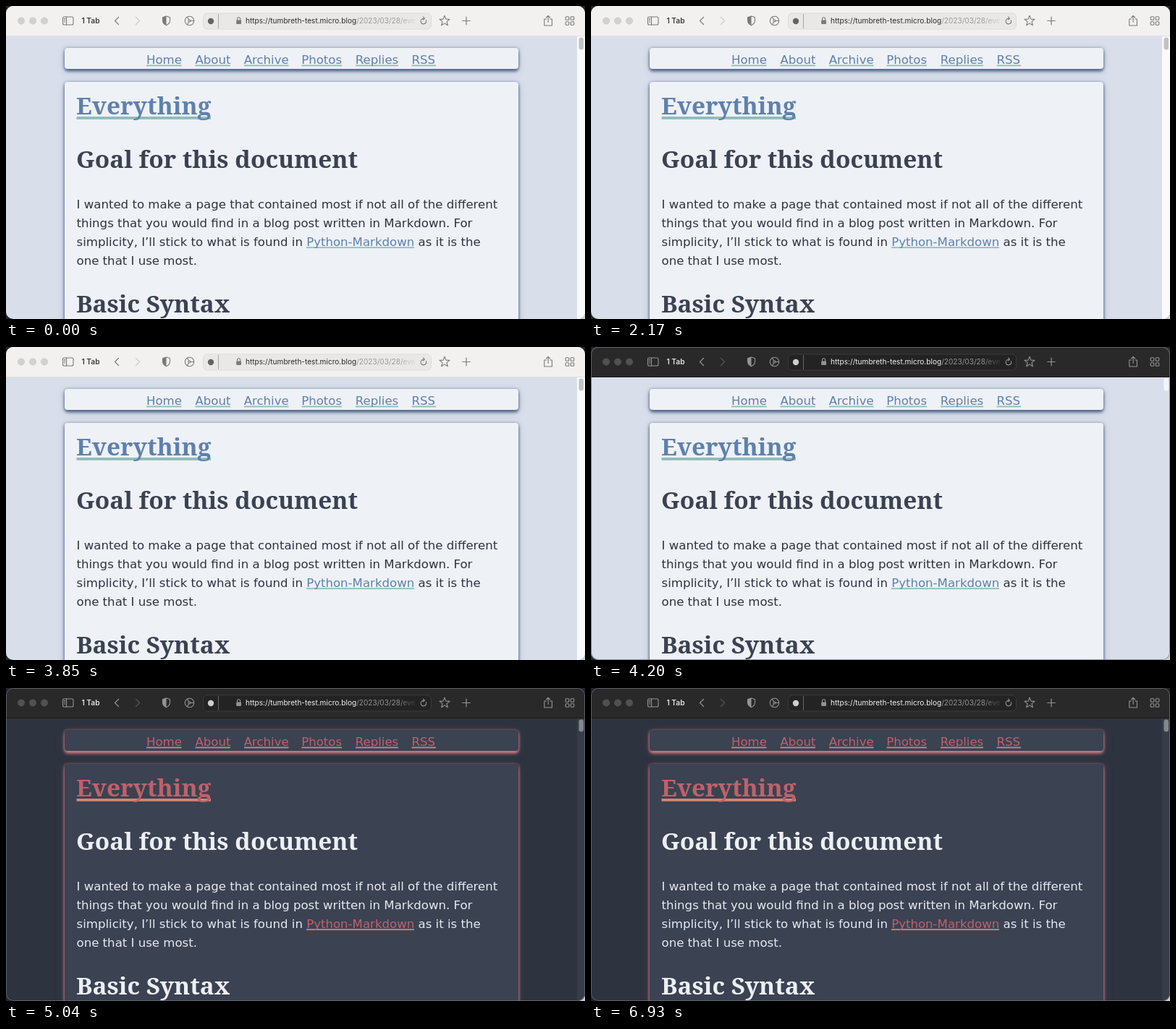
Write an HTML page that moves like this. It is 800 by 433 pixels and loops after 7140 ms.

```html
<!DOCTYPE html>
<html lang="en">
<head>
<meta charset="utf-8">
<title>Light and dark theme</title>
<style>
@property --link { syntax: '<color>'; inherits: true; initial-value: #5e81ac; }
@property --line { syntax: '<color>'; inherits: true; initial-value: #8fbcbb; }

:root {
  --bar: #f2f1f0; --edge: #dfdfe0; --rim: transparent; --dots: #d2d1d0; --dots-rim: #c3c2c1;
  --field: #e9e8e7; --field-rim: #dddcdb; --icon: #7b7a7a; --faint: #cbcac9;
  --label: #3b3b3b; --host: #2c2c2c; --path: #9b9a9a; --knob: #656464;
  --page: #d9dfea; --card: #eef1f6; --head: #3b4252; --text: #2e3440;
  --shadow: #56698a; --glow: #b3bfd3;
  --track: #fafafa; --thumb: #c2c2c2;
  animation: chrome 7140ms step-end infinite, page 7140ms step-end infinite,
    scroller 7140ms step-end infinite, links 7140ms infinite;
}
/* The browser turns dark at 4200 ms, the page one step later */
@keyframes chrome {
  58.82%, 100% {
    --bar: #2a2929; --edge: #171717; --rim: #6d7178; --dots: #525151; --dots-rim: #5b5a5a;
    --field: #242323; --field-rim: #3b3a3a; --icon: #959494; --faint: #555454;
    --label: #e4e4e4; --host: #f1f1f1; --path: #939292; --knob: #cfcece;
  }
}
@keyframes page {
  59.8%, 100% {
    --page: #2d333f; --card: #3b4252; --head: #eceff4; --text: #e5e9f0;
    --shadow: #d27a82; --glow: #4a414d;
  }
}
@keyframes scroller {
  58.82% { --track: #d9dfea; --thumb: #f3f5f8; }
  59.8%, 100% { --track: #363c48; --thumb: #83868c; }
}
@keyframes links {
  0%, 59.8% { --link: #5e81ac; --line: #8fbcbb; animation-timing-function: ease; }
  70.58%, 100% { --link: #bf616a; --line: #d08770; }
}

html, body { margin: 0; width: 100%; height: 100%; overflow: hidden; }
body { background: linear-gradient(135deg, #24262b 90%, #c9ccd2 90%); }
#window {
  position: absolute; left: 0; top: 0; width: 800px; height: 433px;
  overflow: hidden; border-radius: 10px; background: var(--page);
}
.card {
  position: absolute; left: 81px; width: 627px; border-radius: 4px; background: var(--card);
  box-shadow: 0 4px 4px -1px var(--shadow), 0 1px 4px var(--shadow), 0 3px 12px var(--glow);
}
.bar {
  position: absolute; left: 0; top: 0; width: 800px; height: 42px;
  background: var(--bar); border-bottom: 1px solid var(--edge); box-sizing: border-box;
}
.rim {
  position: absolute; inset: 0; border-radius: 10px; box-shadow: inset 0 0 0 1px var(--rim); opacity: .75;
}
svg { position: absolute; left: 0; top: 0; }
text { white-space: pre; }
.body { font: 16.59px "DejaVu Sans", Verdana, sans-serif; fill: var(--text); }
.head { font: bold 33.4px "Noto Serif", Georgia, serif; fill: var(--head); }
.link { fill: var(--link); }
.line { fill: var(--line); }
.ui { font-family: Inter, sans-serif; fill: var(--label); }
.icon { fill: none; stroke: var(--icon); stroke-width: 1.1; stroke-linecap: round; stroke-linejoin: round; }
.solid { fill: var(--icon); stroke: none; }
</style>
</head>
<body>
<div id="window">
  <div class="card" style="top:57.5px;height:29.5px"></div>
  <div class="card" style="top:104.5px;height:360px"></div>
  <div class="bar"></div>

  <svg width="800" height="433" viewBox="0 0 800 433">
    <defs>
      <linearGradient id="fade" gradientUnits="userSpaceOnUse" x1="540" y1="0" x2="570" y2="0">
        <stop offset="0" style="stop-color:var(--path)"/>
        <stop offset="1" style="stop-color:var(--path);stop-opacity:0"/>
      </linearGradient>
    </defs>

    <!-- scrollbar -->
    <rect x="789" y="42" width="11" height="391" style="fill:var(--track)"/>
    <rect x="791.5" y="43.5" width="6.5" height="17" rx="3.2" style="fill:var(--thumb)"/>

    <!-- toolbar -->
    <g style="fill:var(--dots);stroke:var(--dots-rim)" stroke-width=".6">
      <circle cx="21" cy="20.5" r="4.6"/><circle cx="37" cy="20.5" r="4.6"/><circle cx="53" cy="20.5" r="4.6"/>
    </g>
    <rect x="272.5" y="10" width="315" height="22" rx="5.5" style="fill:var(--field);stroke:var(--field-rim)"/>
    <g class="icon">
      <rect x="78.5" y="15" width="14.5" height="11" rx="2"/>
      <path d="M83.5 15v11M80.3 17.6h1.4M80.3 19.8h1.4M80.3 22h1.4"/>
      <path d="M155.5 15.5l-5 5 5 5" stroke-width="1.2"/>
      <path d="M179.5 15.5l5 5-5 5" stroke-width="1.2" style="stroke:var(--faint)"/>
      <path d="M221.5 14l5 1.8v4.4c0 3-2 5-5 6.6-3-1.6-5-3.6-5-6.6v-4.4z"/>
      <path class="solid" d="M221.5 14v12.8c-3-1.6-5-3.6-5-6.6v-4.4z"/>
      <circle cx="253.5" cy="20.5" r="6.2"/>
      <circle cx="253.5" cy="20.5" r="1.5"/>
      <path d="M255 20.5h4.5M252.7 19.2l-2.3-3.9M252.7 21.8l-2.3 3.9"/>
      <path d="M293.5 11.5v19" stroke-width=".6"/>
      <path d="M319.5 19.5v-1.6a2.1 2.1 0 0 1 4.2 0v1.6"/>
      <rect class="solid" x="318.2" y="19.4" width="6.8" height="5.6" rx="1"/>
      <path d="M580.4 19.6a3.8 3.8 0 1 1-2.6-2.2M576.6 15.2l1.8 2.2-2.2 1.6"/>
      <path d="M606 13.3l1.9 4.8 5.1.3-4 3.3 1.3 5-4.3-2.8-4.3 2.8 1.3-5-4-3.3 5.1-.3z"/>
      <path d="M636 15.2v10.6M630.7 20.5h10.6" stroke-width="1.2"/>
      <path d="M746.5 18h-2.7v9h10.6v-9h-2.7M749.1 22.5v-9M746.5 16l2.6-2.6 2.6 2.6"/>
      <rect x="773.2" y="14.7" width="4.6" height="4.6" rx="1"/>
      <rect x="780.2" y="14.7" width="4.6" height="4.6" rx="1"/>
      <rect x="773.2" y="21.7" width="4.6" height="4.6" rx="1"/>
      <rect x="780.2" y="21.7" width="4.6" height="4.6" rx="1"/>
    </g>
    <circle cx="283" cy="21" r="4.2" style="fill:var(--knob)"/>
    <text class="ui" x="104.5" y="24.2" font-size="10.2" font-weight="600">1 Tab</text>
    <text class="ui" x="331" y="24.3" font-size="10.1"><tspan style="fill:var(--host)">https://tumbreth-test.micro.blog</tspan><tspan fill="url(#fade)">/2023/03/28/eve</tspan></text>

    <!-- underlines -->
    <g class="line">
      <rect x="194" y="81.5" width="48.5" height="1.8"/>
      <rect x="261.5" y="81.5" width="48.5" height="1.8"/>
      <rect x="329" y="81.5" width="61.5" height="1.8"/>
      <rect x="408.5" y="81.5" width="55.5" height="1.8"/>
      <rect x="483" y="81.5" width="59" height="1.8"/>
      <rect x="560.5" y="81.5" width="33.5" height="1.8"/>
      <rect x="415" y="333.3" width="149" height="1.8"/>
      <rect x="97.5" y="153" width="185.5" height="3.8"/>
    </g>
    <g class="body">
      <g class="link">
        <text x="194" y="80">Home</text>
        <text x="261.5" y="80">About</text>
        <text x="328.7" y="80">Archive</text>
        <text x="408.2" y="80">Photos</text>
        <text x="482.7" y="80">Replies</text>
        <text x="560.5" y="80">RSS</text>
      </g>
      <text x="97.5" y="280">I wanted to make a page that contained most if not all of the different</text>
      <text x="97.5" y="306">things that you would find in a blog post written in Markdown. For</text>
      <text x="97.5" y="332">simplicity, I’ll stick to what is found in <tspan class="link">Python-Markdown</tspan> as it is the</text>
      <text x="97.5" y="358">one that I use most.</text>
    </g>
    <g class="head">
      <text class="link" x="97" y="150">Everything</text>
      <text x="97" y="224">Goal for this document</text>
      <text x="97" y="423.5">Basic Syntax</text>
    </g>
  </svg>
  <div class="rim"></div>
</div>
</body>
</html>
```
